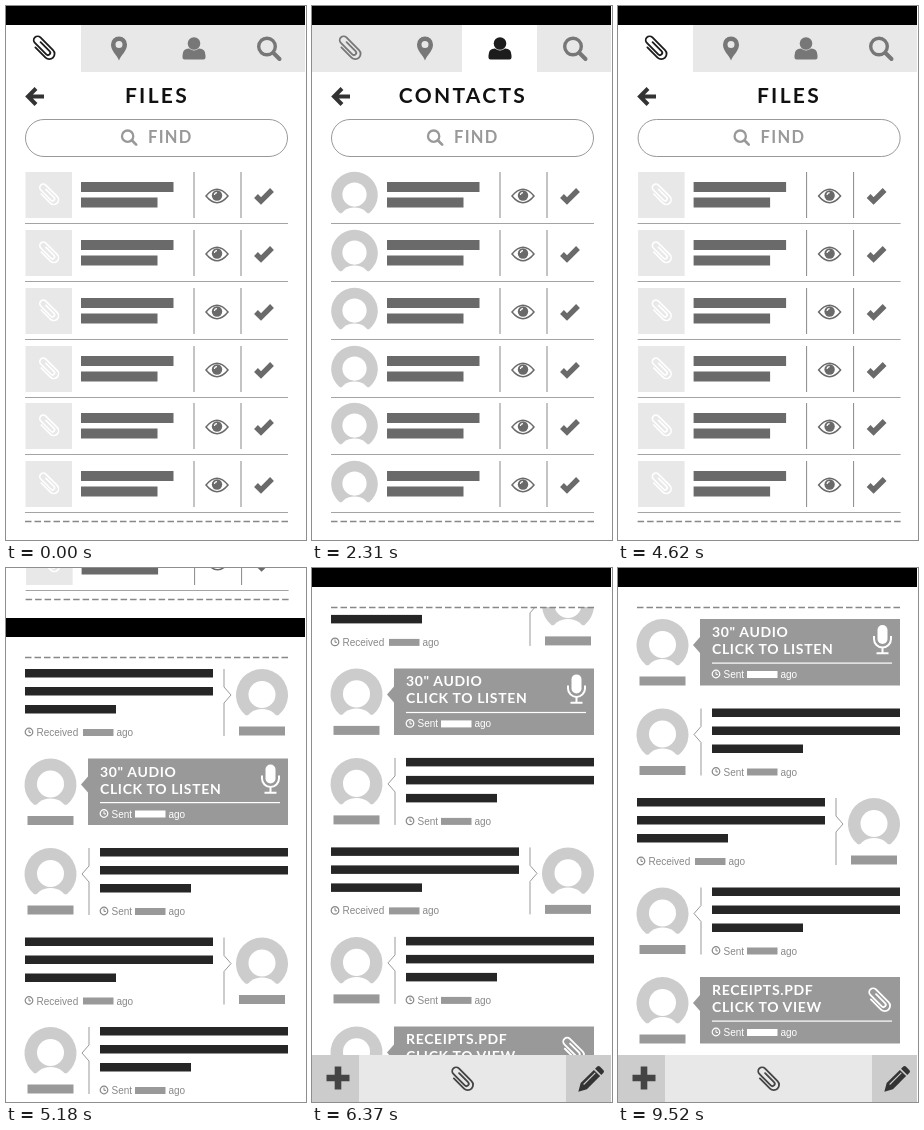
Write an HTML page that moves like this. It is 300 px wide and 534 px high and loops after 9590 ms.

```html
<!DOCTYPE html>
<html lang="en">
<head>
<meta charset="utf-8">
<title>Tabs and chat</title>
<style>
html, body { margin: 0; width: 100%; height: 100%; overflow: hidden; background: #fff; }
svg { display: block; width: 300px; height: 534px; }
.title { font: 700 21px Lato, sans-serif; letter-spacing: 2.3px; text-anchor: middle; fill: #111; }
.find { font: 700 16.5px Lato, sans-serif; letter-spacing: 1.3px; fill: #999; }
.card { font: 700 14px Lato, sans-serif; letter-spacing: .65px; fill: #fff; }
.meta { font: 10px "Liberation Sans", Arial, sans-serif; }
</style>
</head>
<body>
<svg id="stage" viewBox="0 0 300 534"></svg>
<script>
const LOOP = 9590, STEP = 70, W = 300, H = 534, BAR = 19, ROW = 89.5;
const rect = (x, y, w, h, fill) => `<rect x="${x}" y="${y}" width="${w}" height="${h}" fill="${fill}"/>`;
const line = (d, stroke, width = 1, extra = '') =>
  `<path d="${d}" fill="none" stroke="${stroke}" stroke-width="${width}" ${extra}/>`;
const text = (x, y, cls, str, extra = '') => `<text x="${x}" y="${y}" class="${cls}" ${extra}>${str}</text>`;
const at = (x, y, inner, scale = 1) => `<g transform="translate(${x} ${y}) scale(${scale})">${inner}</g>`;
const group = (id, inner) => `<g id="${id}">${inner}</g>`;
const dashes = y => line(`M19 ${y}H282`, '#888', 1.3, 'stroke-dasharray="6.5 3"');
const statusBar = rect(0, 0, W - 1, BAR, '#000');

const icons = {
  clip: c => `<g transform="rotate(-45) scale(1.15)">${line('M-4.6-6V6.5a4.6 4.6 0 0 0 9.2 0V-9a3.4 3.4 0 0 0-6.8 0V5a2 2 0 0 0 4 0V-6', c, 1.6, 'stroke-linecap="round"')}</g>`,
  pin: c => `<path fill="${c}" fill-rule="evenodd" d="M0 12C-2 6-8 3-8-4a8 8 0 0 1 16 0C8 3 2 6 0 12ZM-3.5-4a3.5 3.5 0 1 0 7 0a3.5 3.5 0 1 0-7 0Z"/>`,
  person: c => `<circle cy="-5" r="6.3" fill="${c}"/><path fill="${c}" d="M-11.5 9V7q0-7 6.5-7q5 4 10 0q6.5 0 6.5 7v2q0 2-2 2H-9.5q-2 0-2-2Z"/>`,
  search: c => `<circle cx="-2" cy="-2" r="8.3" fill="none" stroke="${c}" stroke-width="3.4"/>${line('M4.5 4.5L10.5 10.5', c, 4, 'stroke-linecap="round"')}`,
  eye: c => `${line('M-11 0Q0-13.5 11 0Q0 13.5-11 0Z', c, 1.5)}<circle cy="-.5" r="5.2" fill="${c}"/>${line('M-2.6-1Q-2.4-3.4 0-3.4', '#fff', 1.1)}`,
  check: c => line('M-8 .5L-3 5.5L8-5.5', c, 5.4),
  mic: c => `<rect x="-5" y="-15" width="10" height="19" rx="5" fill="${c}"/>${line('M-8.5-4v3a8.5 8.5 0 0 0 17 0v-3M0 8v5M-6 13.3H6', c, 2)}`,
  clock: c => `<circle r="3.8" fill="none" stroke="${c}" stroke-width="1.2"/>${line('M0-2.4V.4H2', c, 1)}`,
  plus: c => line('M-11.5 0H11.5M0-11.5V11.5', c, 6.6),
  pencil: c => `<g transform="rotate(45) scale(1.1)"><path fill="${c}" d="M-4-9H4V8L0 15L-4 8ZM-4-10.5V-13q0-2 2-2H2q2 0 2 2v2.5Z"/>${line('M-1.2-8V7', '#ccc', 1)}</g>`
};

const avatar = (x, y, r) => at(x, y,
  `<path fill="#ccc" d="M-.63 .78A1 1 0 1 1 .63 .78Z"/><ellipse cy="1.02" rx=".62" ry=".48" fill="#fff"/><circle cy="-.02" r=".52" fill="#fff"/>`, r);

/* Tab pages */
const tabs = [['FILES', 'clip'], ['PLACES', 'pin'], ['CONTACTS', 'person'], ['SEARCHES', 'search']];
const order = [0, 1, 2, 3, 0];

function listRow(i, icon) {
  const dark = '#6a6a6a';
  const thumb = icon === 'person' ? avatar(42.5, 23, 23.3)
    : rect(19.5, 0, 46.5, 46, '#e8e8e8') + at(43, 23, icons[icon]('#fff'), .9);
  return at(0, Math.round(166 + 57.85 * i), thumb + rect(75, 10, 92.5, 10, dark) + rect(75, 25.5, 76.5, 10, dark) +
    line('M188 0V46M235 0V46', '#888') + line('M19 51.5H282', '#a4a4a4', 1.2) +
    at(211, 24, icons.eye(dark)) + at(258, 23.5, icons.check(dark)));
}

function listBody(icon) {
  let s = '<rect x="19.5" y="113.5" width="262" height="37" rx="18.5" fill="none" stroke="#999"/>' +
    at(123, 131.5, icons.search('#999'), .68) + text(142, 137, 'find', 'FIND');
  for (let i = 0; i < 6; i++) s += listRow(i, icon);
  return s + dashes(515.5);
}

const tabBar = active => rect(0, 18, W - 1, 48, '#e8e8e8') + rect(active * 75, 18, 75, 48, '#fff') +
  tabs.map(([, icon], i) => at(38 + 75 * i, 42.5, icons[icon](i === active ? '#1c1c1c' : '#777'))).join('');

const lists = order.map((k, i) =>
  group('body' + i, listBody(tabs[k][1])) + group('title' + i, text(151, 97, 'title', tabs[k][0]))).join('');
const browse = lists + tabs.map((_, i) => group('tab' + i, tabBar(i))).join('') +
  statusBar + line('M38 90.5H23M30 82.5L22 90.5L30 98.5', '#333', 4);

/* Chat page */
function meta(x, y, word, color) {
  const sent = word === 'Sent', bar = sent ? 35 : 58;
  return at(x, y, at(4, -4, icons.clock(color)) + text(11.5, 0, 'meta', word, `fill="${color}"`) +
    rect(bar, -7, 30.5, 7, color === '#fff' ? color : '#999') +
    text(bar + 33.5, 0, 'meta', 'ago', `fill="${color}"`));
}

const sender = x => avatar(x, 26, 26) + rect(x - 23, 57.5, 46, 9, '#999');

function message(received) {
  const x = received ? 19 : 94, edge = received ? 218 : 83, tip = received ? 7 : -7;
  return rect(x, 0, 188, 8.5, '#262626') + rect(x, 18, 188, 8.5, '#262626') + rect(x, 36, 91, 8.5, '#262626') +
    meta(x, 67, received ? 'Received' : 'Sent', '#888') +
    line(`M${edge} 0V18l${tip} 8l${-tip} 8V67`, '#999') + sender(received ? 256 : 44.5);
}

const card = (name, action, icon) => sender(44.5) +
  '<path fill="#999" d="M82 0H282V66.5H82V34L75 26L82 18Z"/>' +
  text(94, 18, 'card', name) + text(94, 35, 'card', action) + rect(94, 43.5, 180, 1.2, '#fff') +
  meta(94, 59, 'Sent', '#fff') + icon;

const thread = [
  message(true),
  card('30" AUDIO', 'CLICK TO LISTEN', at(264.5, 21, icons.mic('#fff'))),
  message(false),
  message(true),
  message(false),
  card('RECEIPTS.PDF', 'CLICK TO VIEW', at(261.5, 23.5, icons.clip('#fff')))
];
const chat = rect(0, 0, W, H, '#fff') +
  group('thread', thread.map((m, i) => at(0, 51 + ROW * i, m)).join('')) +
  rect(0, 0, W, 39, '#fff') + statusBar + dashes(39.5) +
  rect(0, 487, W - 1, 47, '#ccc') + rect(47, 487, 207, 47, '#e8e8e8') +
  at(26, 510, icons.plus('#444')) + at(150.5, 511.5, icons.clip('#444')) + at(278, 512, icons.pencil('#333'));

const stage = document.getElementById('stage');
stage.innerHTML = group('browse', browse) + group('chat', chat);

/* Motion */
const slides = [400, 1400, 2400, 3400], SLIDE = 810;
const inOut = (t, start, span, power) => {
  const u = Math.min(1, Math.max(0, (t - start) / span));
  return u < .5 ? 2 ** (power - 1) * u ** power : 1 - 2 ** (power - 1) * (1 - u) ** power;
};
const el = id => document.getElementById(id);
const move = (id, x, y) => el(id).setAttribute('transform', `translate(${x.toFixed(2)} ${y.toFixed(2)})`);

function draw(t) {
  const pos = slides.reduce((sum, s) => sum + inOut(t, s, SLIDE, 4), 0);
  const active = order[slides.filter(s => t >= s).length];
  order.forEach((_, i) => {
    const x = (i - pos) * W;
    // the last title stops 20px short of the centre
    move('title' + i, i === 4 ? Math.max(x, 20) : x, 0);
    move('body' + i, i === 4 ? Math.max(x, .6) : x, 0);
  });
  tabs.forEach((_, i) => el('tab' + i).setAttribute('visibility', i === active ? 'visible' : 'hidden'));
  const up = Math.round(inOut(t, 4560, 924, 4) * H);
  move('browse', 0, -up);
  move('chat', 0, H - up);
  move('thread', 0, -ROW * inOut(t, 5430, 1950, 3));
}

const origin = performance.now();
function tick() {
  const t = (performance.now() - origin) % LOOP;
  draw(Math.floor(t / STEP) * STEP);
  requestAnimationFrame(tick);
}
tick();
</script>
</body>
</html>
```
